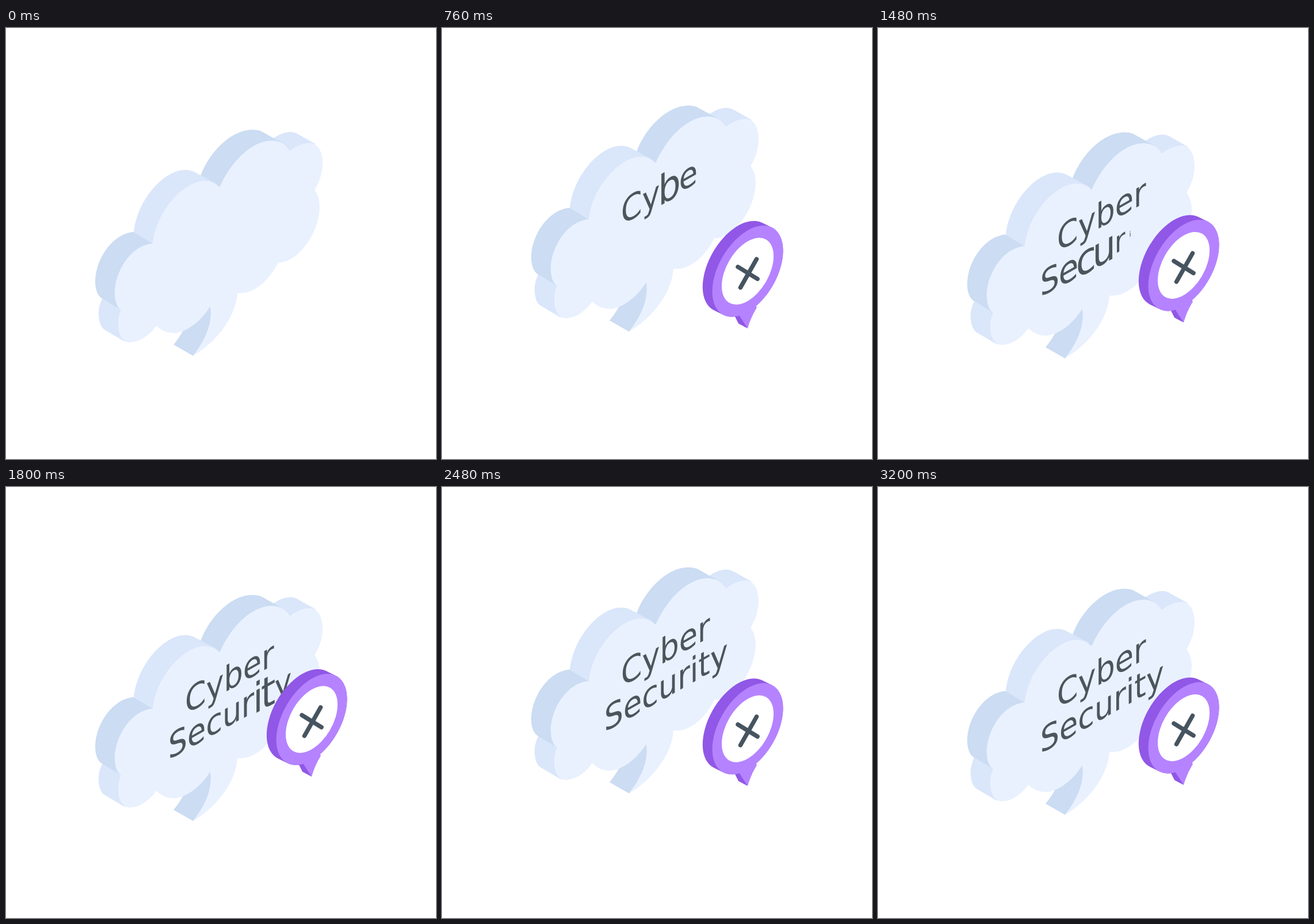
An HTML page for the animation above (3.24 s loop, 747x750 px).

```html
<!DOCTYPE html>
<html lang="en">
<head>
<meta charset="utf-8">
<title>Cyber Security</title>
<style>
  html, body { margin: 0; width: 100%; height: 100%; overflow: hidden; background: #fff; }
  svg { display: block; width: 747px; height: 750px; }
  text { font-family: "DejaVu Sans", Verdana, sans-serif; font-size: 60.5px; fill: #4b555b; }
  .dark { fill: #cbdcf3; }
  .light { fill: #dae6fa; }
  .face { fill: #e9f1ff; }
</style>
</head>
<body>
<svg viewBox="0 0 747 750">
  <g id="cloud">
    <path class="light" d="M464 192Q482 180 495 181Q501 181 506 184L538 202L493 214Z"/>
    <path class="dark" d="M338 257C352 218 390 177 428 177Q438 177 444 180L478 199L493 214L371 277Z"/>
    <path class="light" d="M222 355C228 298 275 247 311 247Q322 247 330 252L364 270L371 277L255 375Z"/>
    <path class="light" d="M167 471Q160 486 161 500Q162 519 171 525L205 545L216 547L200 491Z"/>
    <path class="dark" d="M222 355C186 357 155 402 155 441C155 455 159 466 167 471L200 491L255 375Z"/>
    <path class="dark" d="M355 484C360 515 345 545 325 570.5L291 551Q299 542 308 526Z"/>
    <path class="face" d="M325 570.5C365 546 399 505 402 461C430 464 457 440 473 408
      C505 409 545 359 545 309Q544 292 536 282C545 268 550 251 550 235C550 214 541 200 528 200
      Q511 200 493 214Q482 196 461 196C424 197 389 236 371 277Q360 266 344 266
      C309 267 261 318 255 375C219 377 189 422 189 461Q189 483 200 491Q194 502 195 518
      C196 537 204 547 217 547C233 546 249 535 261 518Q274 531 292 531
      C317 529 342 506 355 484C360 515 345 545 325 570.5Z"/>
    <g id="words"></g>
  </g>
  <g id="badge">
    <path fill="#9157e6" d="M508 496L515 510L531 518.5L519 492Z"/>
    <g transform="matrix(.866 -.5 0 1 531 419)">
      <path d="M0 0L-19.3 -17.8" stroke="#9157e6" stroke-width="142" stroke-linecap="round"/>
      <circle r="71" fill="#b583ff"/>
    </g>
    <path fill="#b583ff" d="M512 488L517 497L531 518.5Q536 500 547 482L540 470Z"/>
    <circle r="52" fill="#fff" transform="matrix(.866 -.5 0 1 531 419)"/>
    <path d="M546.5 398L518.5 447.5M514 411.5L548 432.5" fill="none" stroke="#465460" stroke-width="7.5" stroke-linecap="round"/>
  </g>
</svg>
<script>
const LOOP = 3240, STEP = 40, BOB = 1600;
const $ = id => document.getElementById(id);
const ease = p => (1 - Math.cos(Math.PI * p)) / 2;

// Heights at each quarter of a bob
const cloudY = [0, 21.6, -43.6, 21.6, 0];
const badgeY = [0, -29, 5, -29, 0];
const bob = (stops, t) => {
  const q = (t % BOB) / (BOB / 4), i = Math.floor(q);
  return stops[i] + (stops[i + 1] - stops[i]) * ease(q - i);
};

const pop = (age, rise, fall, peak) => {
  if (age <= 0) return 0;
  if (age < rise) return peak * Math.sin(Math.PI / 2 * age / rise);
  return peak + (1 - peak) * ease(Math.min(1, (age - rise) / fall));
};

const pen = document.createElement("canvas").getContext("2d");
pen.font = '60.5px "DejaVu Sans", Verdana, sans-serif';
const letters = [];

function addWord(word, x, y, start, gap) {
  let offset = 0;
  [...word].forEach((ch, i) => {
    const m = pen.measureText(ch);
    const node = document.createElementNS("http://www.w3.org/2000/svg", "text");
    node.textContent = ch;
    $("words").append(node);
    letters.push({
      node, x, y, offset, start: start + i * gap,
      cx: (m.actualBoundingBoxRight - m.actualBoundingBoxLeft) / 2,
      cy: (m.actualBoundingBoxDescent - m.actualBoundingBoxAscent) / 2
    });
    offset += m.width;
  });
}
addWord("Cyber", 311, 385.5, 0, 200);
addWord("Security", 281.7, 464.4, 950, 100);

function draw(t) {
  $("cloud").setAttribute("transform", `translate(0 ${bob(cloudY, t)})`);
  for (const l of letters) {
    const s = pop(t - l.start, 270, 250, 1.25);
    l.node.style.display = s ? "" : "none";
    l.node.setAttribute("transform", `matrix(.866 -.488 0 1 ${l.x} ${l.y}) ` +
      `translate(${l.offset + l.cx} ${l.cy}) scale(${s}) translate(${-l.cx} ${-l.cy})`);
  }
  const s = pop(t - 160, 320, 240, 1.14);
  $("badge").style.display = s ? "" : "none";
  $("badge").setAttribute("transform",
    `translate(522 ${424 + bob(badgeY, t)}) scale(${s}) translate(-522 -424)`);
}

const begin = performance.now();
function tick() {
  const t = (performance.now() - begin) % LOOP;
  draw(Math.floor(t / STEP) * STEP);
  requestAnimationFrame(tick);
}
tick();
</script>
</body>
</html>
```
